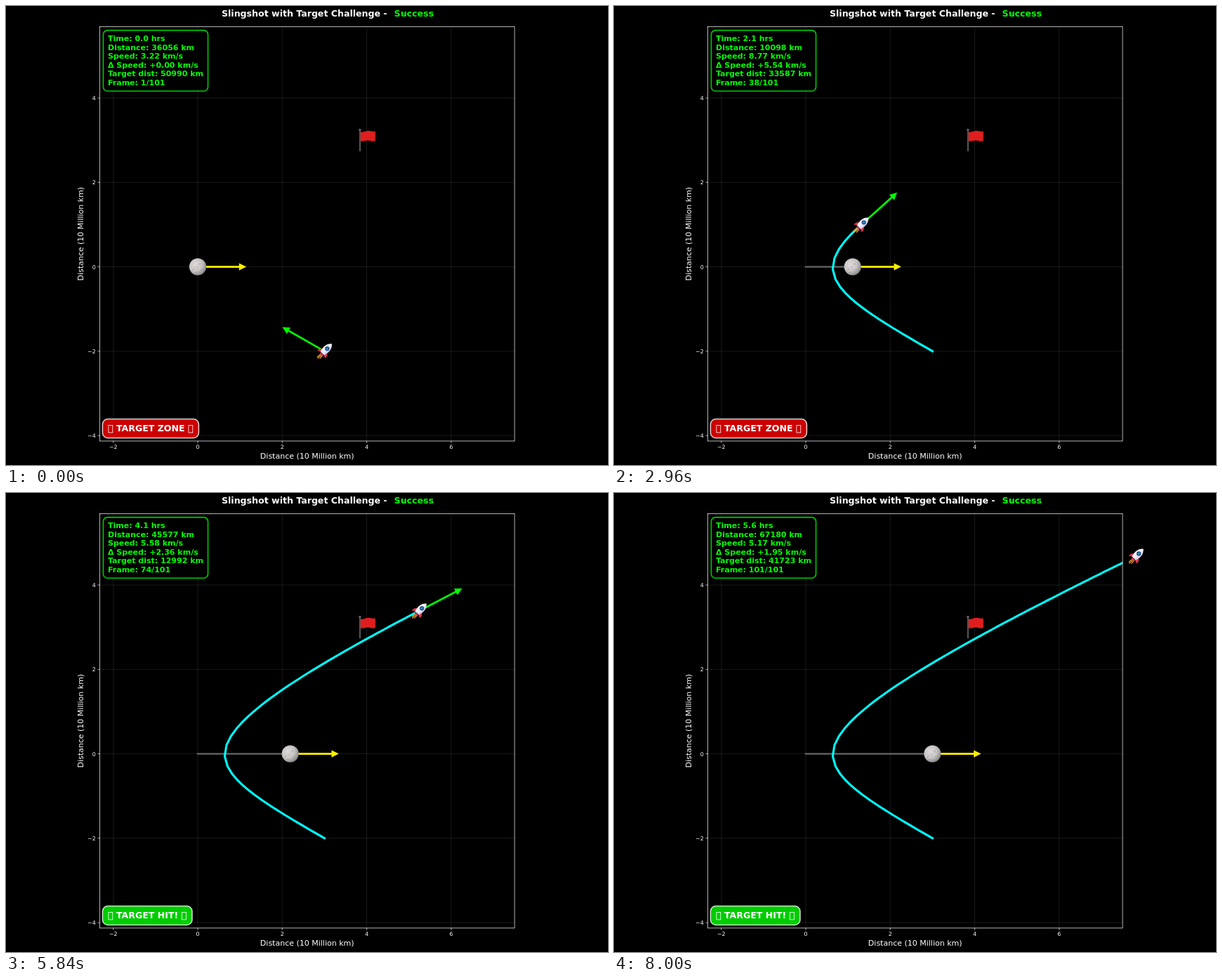
These frames come from a looping animation (857x654 px, 8.08 s). An HTML page:

```html
<!DOCTYPE html>
<html lang="en">
<head>
<meta charset="utf-8">
<title>Slingshot with Target Challenge</title>
<style>
  html, body { margin: 0; width: 100%; height: 100%; overflow: hidden; background: #000; }
  svg { display: block; width: 857px; height: 654px; font-family: "DejaVu Sans", sans-serif; fill: #fff; }
  .bold { font-weight: bold; }
  .title { font-size: 12.57px; }
  .label { font-size: 11px; }
  .tick { font-size: 7.86px; }
  .grid { stroke: #808080; stroke-opacity: .3; stroke-width: .65; }
  .axis { stroke: #fff; stroke-width: .7; fill: none; }
  .arrow { stroke-width: 2.7; stroke-miterlimit: 10; }
</style>
</head>
<body>
<svg viewBox="0 0 857 654">
  <defs>
    <clipPath id="plot"><rect x="133.4" y="29.4" width="590.6" height="590.5"/></clipPath>
    <radialGradient id="moonShade" cx=".36" cy=".36" r=".72">
      <stop offset="0" stop-color="#dedada"/>
      <stop offset=".55" stop-color="#c6c2c2"/>
      <stop offset=".85" stop-color="#989696"/>
      <stop offset="1" stop-color="#6c6b6b"/>
    </radialGradient>
    <linearGradient id="hull" x1="0" y1="0" x2="1" y2="1">
      <stop offset=".35" stop-color="#fff"/>
      <stop offset=".8" stop-color="#c9c3e6"/>
    </linearGradient>
  </defs>

  <text class="bold title" x="307" y="15.4">Slingshot with Target Challenge -</text>
  <text class="bold title" x="552.6" y="15.4" fill="#0f0">Success</text>
  <g id="axes"></g>
  <text class="label" x="428.7" y="645.3" text-anchor="middle">Distance (10 Million km)</text>
  <text class="label" transform="translate(110.3 324.7) rotate(-90)" text-anchor="middle">Distance (10 Million km)</text>

  <g clip-path="url(#plot)" fill="none">
    <path id="moonTrail" stroke="#666" stroke-width="2.36" stroke-linecap="square"/>
    <path id="trail" stroke="#0ff" stroke-width="3.1" stroke-linecap="square" stroke-linejoin="round"/>
    <path id="moonArrow" class="arrow" stroke="#fbf000" fill="#fbf000"/>
    <path id="shipArrow" class="arrow" stroke="#0f0" fill="#0f0"/>
  </g>
  <rect class="axis" x="133.4" y="29.4" width="590.6" height="590.5"/>

  <g id="flag">
    <path d="M503.9 177V207" stroke="#666" stroke-width="1.7"/>
    <circle cx="503.8" cy="176.4" r="1.6" fill="#666"/>
    <path d="M504.8 179.3C508 180.8 511.500 177.700 516 177.700C520 177.700 522 179.500 525.700 178.500V192.300C521 193.500 519 191.300 515 191.400C511 191.500 508.500 193.500 504.800 192.400Z" fill="#e01e1e"/>
  </g>

  <g id="moon">
    <circle r="12.1" fill="url(#moonShade)"/>
    <g fill="#aaa6a6" fill-opacity=".6">
      <circle cx="-6.500" cy="3.500" r="1.500"/><circle cx="-4" cy="7.500" r="1.700"/>
      <circle cx="3" cy="-4" r="1.300"/><circle cx="-1.500" cy="1" r="1"/><circle cx="5" cy="4" r="1.500"/>
    </g>
    <path d="M-9 3l3-1M-6 7l3-2M0-7l2 1M2 2l2-1" stroke="#ece8e8" stroke-width=".7"/>
  </g>

  <g id="ship">
    <path d="M-4.500 3.500L-10 8M-3.800 5L-9.500 10M-2.800 6.200L-6.500 10.200" stroke="#f29a2e" stroke-width="1.300" stroke-linecap="round"/>
    <path d="M-2-3.500C-6-4.800-9-3-10.300-.2C-8-.6-6.500 0-5.500 1.200Z" fill="#dc3850"/>
    <path d="M3.500 2C4.800 6 3.500 8.500 .5 10C0 8-.5 6.500-1.500 5.500Z" fill="#dc3850"/>
    <path d="M-5.500 .5L-.5 5.500L-3.500 6.300L-6.300 3.500Z" fill="#b92f49"/>
    <path d="M10.500-10.500C11 -5 8.500 1-.3 5.600L-5.600 .3C-1-8.500 5-11 10.500-10.500Z" fill="url(#hull)"/>
    <circle cx="3.900" cy="-3.700" r="3.100" fill="#173e73"/>
    <circle cx="3.900" cy="-3.700" r="2" fill="#2f86c6"/>
  </g>

  <rect id="infoBox" x="138.4" y="34.6" height="86.700" rx="6" fill="#000" fill-opacity=".8" stroke="#0f0" stroke-opacity=".8" stroke-width="1.570"/>
  <g id="info" class="bold label" fill="#0f0"></g>

  <rect id="badgeBox" x="137.400" y="588.500" height="27" rx="7.500" fill-opacity=".8" stroke="#fff" stroke-opacity=".8" stroke-width="1.570"/>
  <text id="badge" class="bold title" x="156.900" y="606"></text>
  <g fill="none" stroke="#fff" stroke-width=".800">
    <rect x="145.900" y="597.400" width="5.900" height="10.500"/>
    <rect id="endGlyph" y="597.400" width="5.900" height="10.500"/>
  </g>
</svg>
<script>
const STEP = 80, COUNT = 101, DT = 200, KM = 1e4;
const MOON_SPEED = 1.5, HIT_RANGE = 5000;
const target = { x: 4 * KM, y: 3 * KM };
const px = x => 273 + x / KM * 60.13;
const py = y => 371.6 - y / KM * 60.13;
const $ = id => document.getElementById(id);

function add(parent, tag, attrs, text) {
  const el = document.createElementNS('http://www.w3.org/2000/svg', tag);
  for (const k in attrs) el.setAttribute(k, attrs[k]);
  if (text) el.textContent = text;
  return parent.appendChild(el);
}

// Semi-implicit Euler fly-by of a steadily moving moon
function simulate(gm) {
  let x = 3 * KM, y = -2 * KM, vx = -2.8, vy = 1.6;
  const states = [];
  for (let i = 0; i < COUNT; i++) {
    const moon = MOON_SPEED * DT * i, rx = x - moon;
    const range = Math.hypot(rx, y), pull = gm * DT / range ** 3;
    states.push({ x, y, vx, vy, moon, range,
      speed: Math.hypot(vx, vy), toTarget: Math.hypot(x - target.x, y - target.y) });
    vx -= pull * rx;
    vy -= pull * y;
    x += vx * DT;
    y += vy * DT;
  }
  return states;
}

// Choose the gravity that best meets known ranges (km) along the way
function calibrate() {
  const known = [[20, 16242], [37, 10098], [58, 32368], [73, 45577], [81, 52201], [100, 67180]];
  let best, least = Infinity;
  for (let gm = 244000; gm <= 246000; gm += 2) {
    const run = simulate(gm);
    const miss = known.reduce((sum, [i, d]) => sum + (run[i].range - d) ** 2, 0);
    if (miss < least) { least = miss; best = run; }
  }
  return best;
}

const states = calibrate();
const hitAt = states.findIndex(s => s.toTarget < HIT_RANGE);

function drawAxes() {
  const g = $('axes'), name = n => String(n).replace('-', '\u2212');
  for (let n = -4; n <= 6; n += 2) {
    const x = px(n * KM), y = py(n * KM);
    if (n > -4) {
      add(g, 'path', { class: 'grid', d: `M${x} 29.4V619.9` });
      add(g, 'path', { class: 'axis', d: `M${x} 619.9v2.75` });
      add(g, 'text', { class: 'tick', x, y: 631.4, 'text-anchor': 'middle' }, name(n));
    }
    if (n < 6) {
      add(g, 'path', { class: 'grid', d: `M133.4 ${y}H724` });
      add(g, 'path', { class: 'axis', d: `M133.4 ${y}h-2.75` });
      add(g, 'text', { class: 'tick', x: 127.7, y: y + 2.9, 'text-anchor': 'end' }, name(n));
    }
  }
}

function setArrow(id, x, y, vx, vy) {
  const angle = Math.atan2(-vy, vx) * 180 / Math.PI;
  $(id).setAttribute('transform', `translate(${px(x)} ${py(y)}) rotate(${angle})`);
}

function place(id, x, y) {
  $(id).setAttribute('transform', `translate(${px(x)} ${py(y)})`);
}

drawAxes();
for (const id of ['moonArrow', 'shipArrow']) $(id).setAttribute('d', 'M0 0H60.1V-3L66.1 0L60.1 3V0');
const lines = Array.from({ length: 6 }, (_, i) => add($('info'), 'text', { x: 145, y: 50.1 + 12.58 * i }));
const points = states.map(s => `${px(s.x).toFixed(2)} ${py(s.y).toFixed(2)}`);

function setInfo(s, i) {
  const gain = s.speed - states[0].speed;
  [
    `Time: ${(i * DT / 3600).toFixed(1)} hrs`,
    `Distance: ${s.range.toFixed(0)} km`,
    `Speed: ${s.speed.toFixed(2)} km/s`,
    `\u0394 Speed: ${gain < 0 ? '' : '+'}${gain.toFixed(2)} km/s`,
    `Target dist: ${s.toTarget.toFixed(0)} km`,
    `Frame: ${i + 1}/${COUNT}`
  ].forEach((text, n) => { lines[n].textContent = text; });
  const width = Math.max(...lines.map(el => el.getComputedTextLength()));
  $('infoBox').setAttribute('width', width + 13.2);
}

function setBadge(hit) {
  $('badge').textContent = hit ? 'TARGET HIT!' : 'TARGET ZONE';
  const end = 156.9 + $('badge').getComputedTextLength() + 4.37;
  $('endGlyph').setAttribute('x', end + .9);
  $('badgeBox').setAttribute('width', end + 15.4 - 137.4);
  $('badgeBox').setAttribute('fill', hit ? '#0f0' : '#f00');
}

function render(i) {
  const s = states[i];
  $('trail').setAttribute('d', i ? 'M' + points.slice(0, i + 1).join('L') : '');
  $('moonTrail').setAttribute('d', i ? `M${px(0)} ${py(0)}H${px(s.moon)}` : '');
  setArrow('moonArrow', s.moon, 0, 1, 0);
  setArrow('shipArrow', s.x, s.y, s.vx, s.vy);
  place('moon', s.moon, 0);
  place('ship', s.x, s.y);
  setInfo(s, i);
  setBadge(hitAt >= 0 && i >= hitAt);
}

let shown = -1;
const start = performance.now();
function tick() {
  const i = Math.floor((performance.now() - start) / STEP) % COUNT;
  if (i !== shown) render(shown = i);
  requestAnimationFrame(tick);
}
tick();
</script>
</body>
</html>
```
